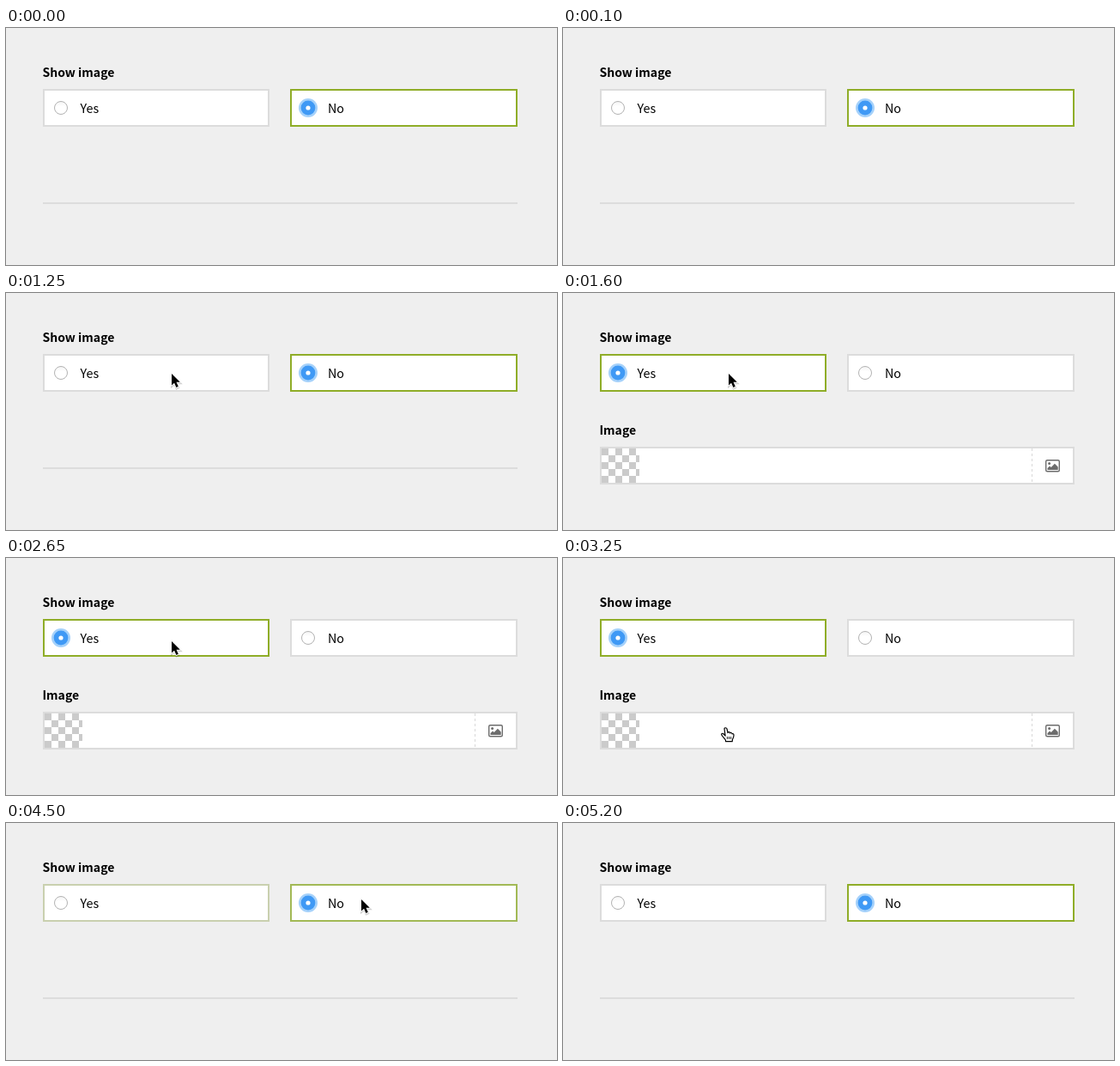
An HTML page for the animation above (5.3 s loop, 642 by 276 pixels).

```html
<!DOCTYPE html>
<html lang="en">
<head>
<meta charset="utf-8">
<title>Conditional image field</title>
<style>
  html, body { margin: 0; width: 100%; height: 100%; overflow: hidden; background: #efefef; }
  svg { display: block; width: 100%; height: 100%; }
  text {
    font-family: "Noto Sans CJK SC", "Noto Sans CJK JP", "Noto Sans CJK", "Open Sans", sans-serif;
    font-size: 14.33px; fill: #000;
  }
  .label { font-size: 14px; font-weight: 700; }
</style>
</head>
<body>
<svg viewBox="0 0 642 276">
  <defs>
    <pattern id="checks" x="45" y="181" width="16" height="16" patternUnits="userSpaceOnUse">
      <path d="M0 0h8v8h-8zM8 8h8v8h-8z" fill="#cbcbcb"/>
    </pattern>
    <linearGradient id="knob" x2="0" y2="1">
      <stop stop-color="#f4f4f4"/><stop offset=".4" stop-color="#fff"/>
    </linearGradient>
    <g id="off">
      <circle r="7.5" fill="url(#knob)" stroke="#b2b2b2"/>
    </g>
    <g id="on">
      <circle r="11" fill="#a5d1fa"/>
      <circle r="8.4" fill="#3f99f5"/>
      <circle r="2.6" fill="#fff"/>
    </g>
  </defs>
  <rect width="642" height="276" fill="#efefef"/>
  <text class="label" x="42.5" y="57">Show image</text>

  <rect id="yesBox" x="44" y="72" width="262" height="42" fill="#fff" stroke-width="2"/>
  <rect id="noBox" x="332" y="72" width="263" height="42" fill="#fff" stroke-width="2"/>
  <use id="yesDot" x="64" y="93"/>
  <use id="noDot" x="352" y="93"/>
  <text x="86.5" y="99">Yes</text>
  <text x="375" y="99">No</text>

  <rect id="rule" x="43" y="203" width="553" height="2" fill="#dcdcdc"/>

  <g id="field">
    <text class="label" x="42.5" y="165">Image</text>
    <rect x="44" y="180" width="551" height="42" fill="#fff" stroke="#dcdcdc" stroke-width="2"/>
    <rect x="45" y="181" width="44" height="40" fill="url(#checks)"/>
    <path d="M546.5 181v40" stroke="#d8d8d8" stroke-dasharray="3 3"/>
    <rect x="562.7" y="194.7" width="15.6" height="13" rx="1.5" fill="none" stroke="#6c6c6c" stroke-width="1.4"/>
    <circle cx="566.6" cy="198.5" r="1.5" fill="#6c6c6c"/>
    <path d="M564.5 206v-2l2.6-2.6 1.6 1.6 4.2-4.2 3.8 3.8v3.4z" fill="#6c6c6c"/>
  </g>

  <g id="cursor">
    <g id="arrow">
      <path d="M0 1v14l3.2-2.8 2.4 5.2 2.6-1.2-2.3-5h4.5z" fill="#000" opacity=".18" stroke="#000" stroke-width="2"/>
      <path d="M0 0v13.6l3.1-2.9 2.3 5.2 2.4-1.1-2.3-5h4.3z" fill="#000" stroke="#fff" stroke-width="2" stroke-linejoin="round" paint-order="stroke"/>
    </g>
    <g id="hand" stroke="#000" stroke-width="1.2" stroke-linejoin="round">
      <path d="M-2 1C-2-.7 .6-.7 1 1L2 5.6C2.4 4.2 4.4 4.4 4.6 6C5.2 5 6.9 5.4 7 6.8C7.8 6.2 9 6.8 9 8C9.2 10.5 8 12 7.4 13.4L7.2 15.6H-.4L-.6 14C-2 12-4 10-5.2 8C-5.8 6.6-4 5.8-2.8 7L-.9 9Z" fill="#fff"/>
      <path d="M1.4 10v3M3.5 10v3M5.6 10v3" stroke-width=".9"/>
    </g>
  </g>
</svg>
<script>
const LOOP = 5300, STEP = 50, FADE = 200;
const PICK_YES = 1450, PICK_NO = 4400, ENTER = 600, LEAVE = 4950;
const GREY = [220, 220, 220], GREEN = [143, 173, 40];

const linear = u => u;
const smooth = u => u * u * (3 - 2 * u);
const speedUp = u => u ** 1.5;

// time, x, y, easing towards this point
const path = [
  [600, 625, 184, linear],
  [900, 331, 145, linear],
  [1100, 221, 112, linear],
  [1250, 193, 94, linear],
  [2600, 193, 94, linear],
  [3100, 190, 198, smooth],
  [3550, 190, 198, linear],
  [4100, 414, 89, smooth],
  [4500, 414, 89, linear],
  [4900, 632, 133, speedUp]
];

const $ = id => document.getElementById(id);
const show = (id, visible) => $(id).setAttribute("display", visible ? "inline" : "none");
const mix = (a, b, u) => a + (b - a) * u;
const clamp = u => Math.max(0, Math.min(1, u));

function pointAt(t) {
  const i = path.findIndex(p => p[0] >= t);
  if (i < 0) return path[path.length - 1].slice(1, 3);
  if (i === 0) return path[0].slice(1, 3);
  const [t0, x0, y0] = path[i - 1];
  const [t1, x1, y1, ease] = path[i];
  const u = ease((t - t0) / (t1 - t0));
  return [mix(x0, x1, u), mix(y0, y1, u)];
}

function setOption(name, selected, amount) {
  const rgb = GREY.map((c, i) => Math.round(mix(c, GREEN[i], amount)));
  $(name + "Box").setAttribute("stroke", `rgb(${rgb})`);
  $(name + "Dot").setAttribute("href", selected ? "#on" : "#off");
}

function render(t) {
  const yes = t >= PICK_YES && t < PICK_NO;
  const since = t >= PICK_NO ? t - PICK_NO : t >= PICK_YES ? t - PICK_YES : FADE;
  const u = clamp((since + STEP) / FADE);
  setOption("yes", yes, yes ? u : 1 - u);
  setOption("no", !yes, yes ? 1 - u : u);
  show("field", yes);
  show("rule", !yes);

  const [x, y] = pointAt(t);
  const overField = yes && y >= 179;
  show("cursor", t >= ENTER && t < LEAVE);
  show("arrow", !overField);
  show("hand", overField);
  $("cursor").setAttribute("transform", `translate(${Math.round(x)} ${Math.round(y)})`);
}

const start = performance.now();
function tick() {
  const t = (performance.now() - start) % LOOP;
  render(Math.floor(t / STEP) * STEP);
  requestAnimationFrame(tick);
}
tick();
</script>
</body>
</html>
```
